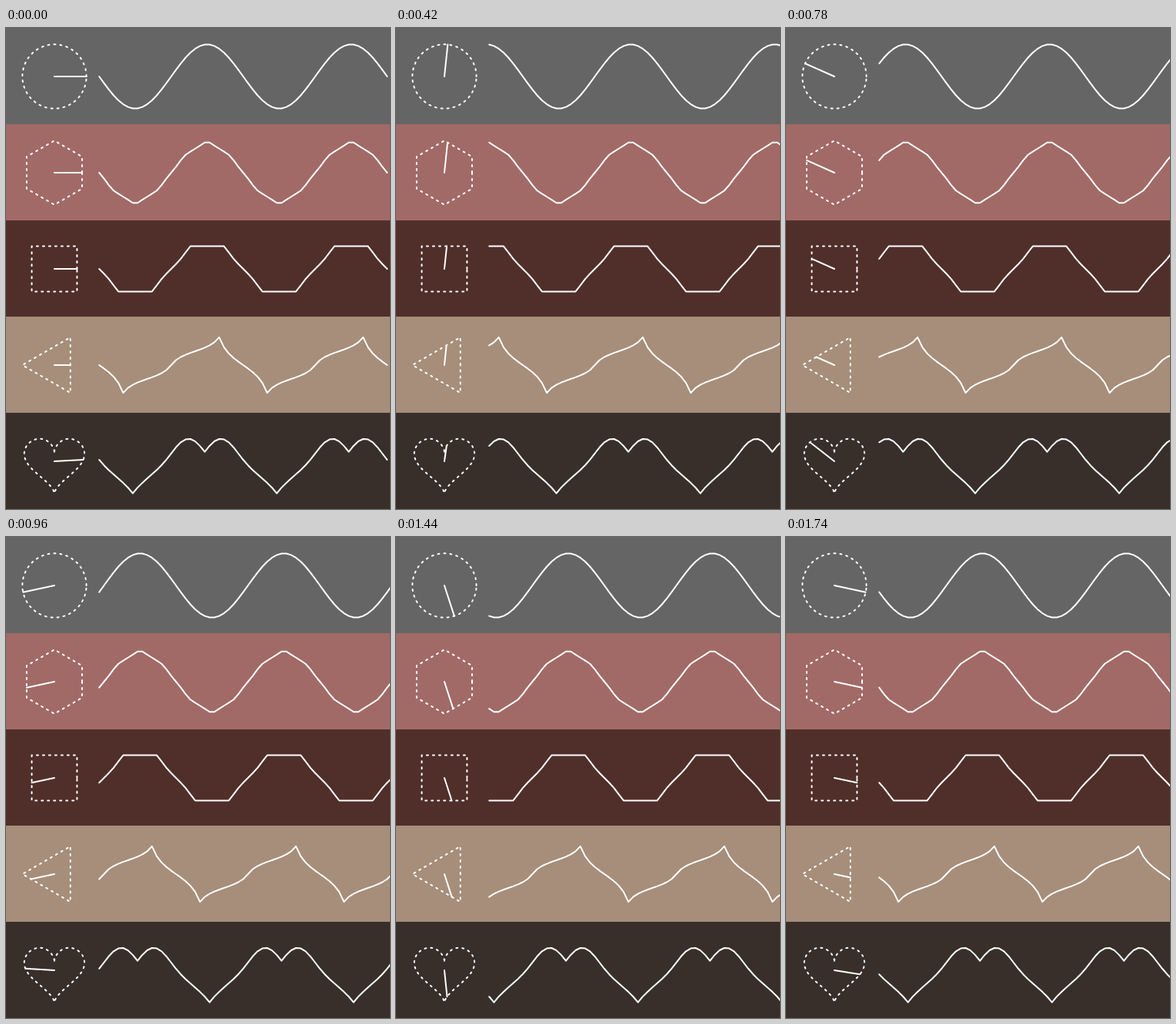
Animation, 500 px wide and 625 px high, one loop 1800 ms. Source, as an HTML page with a canvas:

```html
<!DOCTYPE html>
<html lang="en">
<head>
<meta charset="utf-8">
<title>Shape waves</title>
<style>
html, body { margin: 0; width: 100%; height: 100%; overflow: hidden; background: #382f2a; }
canvas { display: block; }
</style>
</head>
<body>
<canvas id="stage" width="500" height="625"></canvas>
<script>
const ctx = document.getElementById('stage').getContext('2d');
const TAU = Math.PI * 2;
const STEPS = 30, STEP_MS = 60;
const R = 125 / 3, CX = 63, CY = 63, ROW = 125;
const WAVE_X = 121.33, DX = 6.25;

const mod = (a, n) => ((a % n) + n) % n;
const polar = (r, a) => [r * Math.cos(a), -r * Math.sin(a)];
const range = (n, fn) => Array.from({ length: n }, (_, i) => fn(i));

function circle() {
  return {
    outline: range(240, i => polar(R, i / 240 * TAU)),
    points: range(STEPS, i => polar(R, i / STEPS * TAU))
  };
}

// Regular polygon whose first vertex sits at the given angle in degrees
function polygon(n, deg) {
  const first = deg * Math.PI / 180, seg = TAU / n;
  const radius = a => R * Math.cos(seg / 2) / Math.cos(mod(a - first, seg) - seg / 2);
  const corners = range(n, i => polar(R, first + i * seg));
  return {
    outline: [polar(radius(0), 0), ...corners],
    points: range(STEPS, i => polar(radius(i / STEPS * TAU), i / STEPS * TAU))
  };
}

// Heart curve, walked at constant speed along its length
function heart() {
  const k = R / 17, n = 1500, cos = Math.cos;
  const at = t => [
    16 * k * Math.sin(t) ** 3,
    -k * (13 * cos(t) - 5 * cos(2 * t) - 2 * cos(3 * t) - cos(4 * t))
  ];
  const outline = range(n + 1, i => at(i / n * TAU));
  const dist = [0];
  for (let i = 1; i <= n; i++) {
    const [a, b] = [outline[i - 1], outline[i]];
    dist.push(dist[i - 1] + Math.hypot(b[0] - a[0], b[1] - a[1]));
  }
  const points = range(STEPS, j => {
    const goal = mod(8 - j, STEPS) / STEPS * dist[n];
    return outline[dist.findIndex(d => d >= goal - 1e-6)];
  });
  return { outline, points };
}

const rows = [
  ['#656565', circle()],
  ['#a16a67', polygon(6, 30)],
  ['#502f2a', polygon(4, 45)],
  ['#a68e7a', polygon(3, 60)],
  ['#382f2a', heart()]
];

function stroke(pts, closed) {
  ctx.beginPath();
  pts.forEach(p => ctx.lineTo(p[0], p[1]));
  if (closed) ctx.closePath();
  ctx.stroke();
}

function draw(step) {
  ctx.strokeStyle = '#fff';
  ctx.lineWidth = 2;
  ctx.lineCap = ctx.lineJoin = 'round';
  rows.forEach(([color, shape], row) => {
    ctx.fillStyle = color;
    ctx.fillRect(0, row * ROW, 500, ROW);
    ctx.save();
    ctx.translate(CX, CY + row * ROW);
    ctx.setLineDash([2, 6]);
    stroke(shape.outline, true);
    ctx.setLineDash([]);
    stroke([[0, 0], shape.points[step]]);
    stroke(range(2 * STEPS + step + 1, i =>
      [WAVE_X - CX + i * DX, shape.points[mod(step - i, STEPS)][1]]));
    ctx.restore();
  });
}

const start = performance.now();
function tick() {
  draw(Math.floor((performance.now() - start) / STEP_MS) % STEPS);
  requestAnimationFrame(tick);
}
tick();
</script>
</body>
</html>
```
